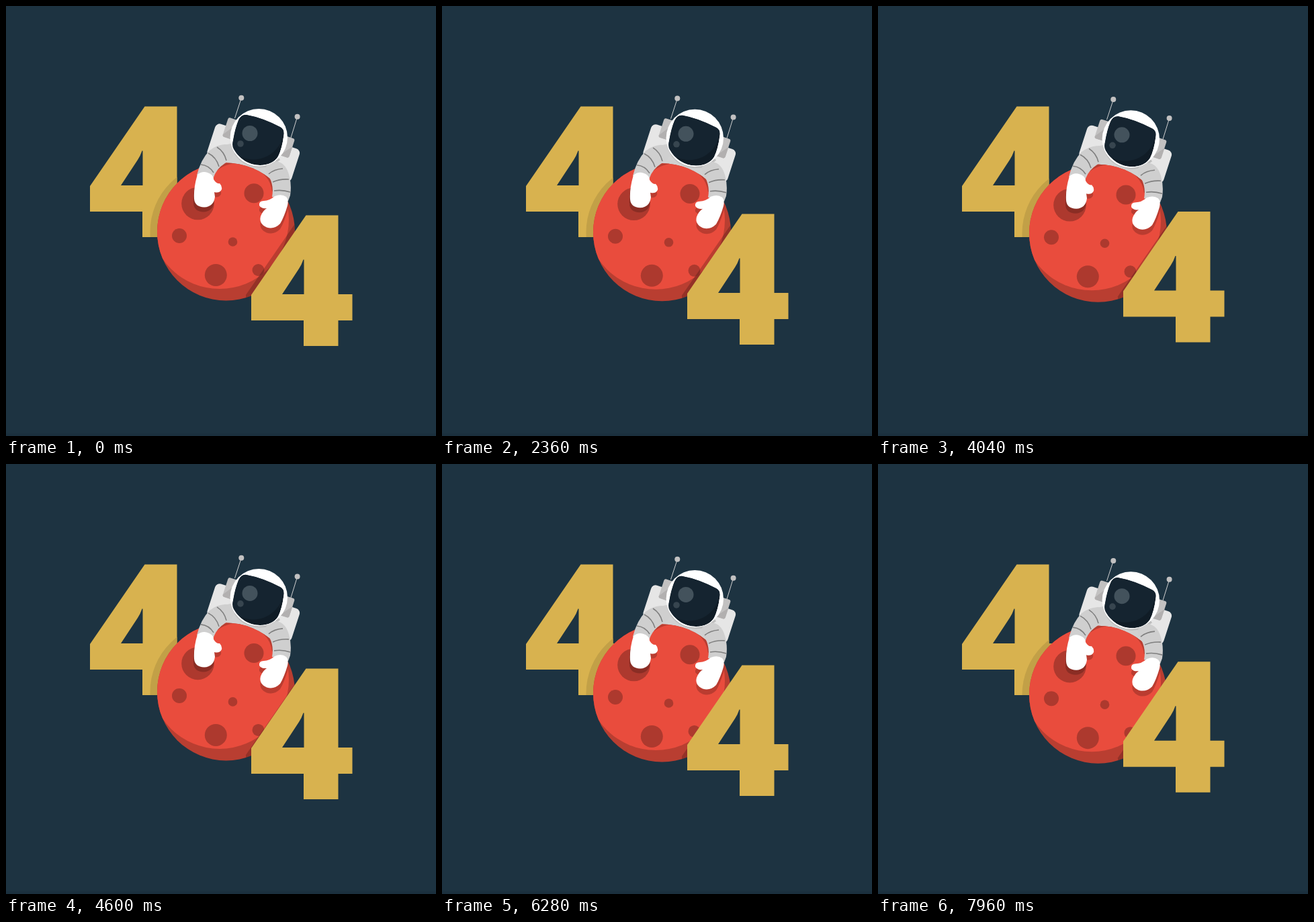
An HTML page that plays this animation: 640 px wide and 640 px high, repeating every 8 s.

```html
<!DOCTYPE html>
<html lang="en">
<head>
<meta charset="utf-8">
<title>404</title>
<style>
html, body { margin: 0; width: 100%; height: 100%; overflow: hidden; background: #1d3341; }
svg { display: block; width: 100%; height: 100%; }
</style>
</head>
<body>
<svg viewBox="0 0 640 640">
  <defs>
    <path id="four" d="M206.5 149.5H254.5V267H275.5V306H254.5V344H203V306H125V268ZM171 267H203.5V215.5H202.5Q200 223 196 229Z" fill-rule="evenodd"/>
    <circle id="disc" cx="327.5" cy="336" r="102.5"/>
    <path id="gloveL" d="M285 251Q292 245 300 248Q309 251 309 258Q313 265 318 264Q322 268 321 273Q318 279 310 277L311 284Q309 299 295 299.5Q281 299 280 287Q279 270 285 251Z"/>
    <path id="gloveR" d="M400 283Q410 279 417 284Q421 288 419 297Q414 314 408 324Q399 333 388 329.5Q376 324 379 313Q382 305 388 301Q380 302 377 297Q376 290 384 290Q392 290 400 283Z"/>
    <path id="visor" d="M358 162Q381 166 408 180Q415 184 413.5 192Q411 212 405 224Q397 236.5 378 237Q352 236 339 213Q336 208 338 200Q341 182 346 170Q350 161 358 162Z"/>
    <clipPath id="inFour"><use href="#four" clip-rule="evenodd"/></clipPath>
    <clipPath id="inDisc"><use href="#disc"/></clipPath>
    <clipPath id="inVisor"><use href="#visor"/></clipPath>
  </defs>

  <rect y="636" width="640" height="4" fill="#1b303e"/>

  <use href="#four" fill="#d8b24f"/>
  <g clip-path="url(#inFour)">
    <g class="drift"><use href="#disc" x="-10.5" fill="#c2a047"/></g>
  </g>

  <g class="drift">
    <!-- backpack, ears and antennas -->
    <g transform="translate(376 196) rotate(18)">
      <rect x="-66.5" y="-2" width="132" height="51" rx="7" fill="#e6e6e6"/>
      <g fill="#c2c1c1">
        <rect x="-52" y="-15" width="16" height="30" rx="3"/>
        <rect x="36" y="-15" width="16" height="30" rx="3"/>
      </g>
      <path d="M-52 12L-38 -8V15H-49Q-52 15 -52 12ZM38 15L52 -3V12Q52 15 49 15Z" fill="#b2b0b0"/>
    </g>
    <path d="M340.5 167L350.3 137M424 196L433.6 165" stroke="#d0d0d0" fill="none"/>
    <g fill="#c2c1c1"><circle cx="350.3" cy="136.8" r="4"/><circle cx="433.6" cy="164.7" r="4"/></g>

    <!-- chest -->
    <path d="M320 208L338 204L400 231L412 240L400 272H316Z" fill="#d1d1d1"/>
    <path d="M334 208Q344 236 372 240Q392 243 408 229L402 220L350 200Z" fill="#bfbfbf"/>

    <!-- planet -->
    <use href="#disc" fill="#b93e31"/>
    <g clip-path="url(#inDisc)">
      <circle cx="318" cy="318" r="103" fill="#e94c3d"/>
      <path d="M304 258Q314 238 340 234L326 228L300 240ZM370 242Q393 252 396 276L404 270L398 252Z" fill="#b93e31"/>
      <g fill="#ad392e">
        <circle cx="285.5" cy="294" r="24.3"/>
        <circle cx="369" cy="278.7" r="14.5"/>
        <circle cx="258" cy="342" r="11"/>
        <circle cx="337.5" cy="351" r="6.8"/>
        <circle cx="312.3" cy="400.5" r="16.5"/>
        <circle cx="375.5" cy="393" r="9"/>
      </g>
      <g opacity=".2">
        <use href="#gloveL" x="-1" y="7"/>
        <use href="#gloveR" y="8"/>
        <path d="M438.5 312L357 430V470H460V312Z"/>
      </g>
    </g>

    <!-- arms and gloves -->
    <g fill="#cfcfcf">
      <path d="M325 206Q340 205 340 218Q338 228 326 234Q312 243 308 258L284 252Q290 228 303 215Q313 207 325 206Z"/>
      <path d="M398 231Q412 230 419 245Q426 262 423 282L420 290L396 284Q399 268 392 255Q383 243 389 236Q393 232 398 231Z"/>
    </g>
    <path d="M314 210Q325 217 328 230M301 219Q313 225 317 239M290 236Q302 237 309 248M391 250Q399 243 412 242M397 262Q408 257 421 258M399 275Q411 273 423 277" fill="none" stroke="#7f7f7f" stroke-width="1.6"/>
    <g fill="#fff"><use href="#gloveL"/><use href="#gloveR"/></g>

    <!-- helmet -->
    <circle cx="376.3" cy="195.7" r="42.7" fill="#fff"/>
    <g clip-path="url(#inVisor)">
      <use href="#visor" fill="#101c26"/>
      <circle cx="368" cy="183" r="45.5" fill="#152430"/>
    </g>
    <circle cx="363" cy="189.5" r="11.5" fill="#43525c"/>
    <circle cx="349" cy="205" r="4.8" fill="#37454f"/>
  </g>

  <g id="front"><use href="#four" x="240" y="162" fill="#d8b24f"/></g>
</svg>
<script>
const LOOP = 8000, HALF_SWING = 13540;
const drifters = document.querySelectorAll('.drift');
const front = document.getElementById('front');
const shift = (el, y) => el.setAttribute('transform', `translate(0 ${y.toFixed(3)})`);

function draw() {
  const t = performance.now() % LOOP;
  const swing = (1 - Math.cos(Math.PI * t / HALF_SWING)) / 2;
  drifters.forEach(el => shift(el, 11.2 * swing));
  shift(front, -27 * swing);
  requestAnimationFrame(draw);
}
draw();
</script>
</body>
</html>
```
